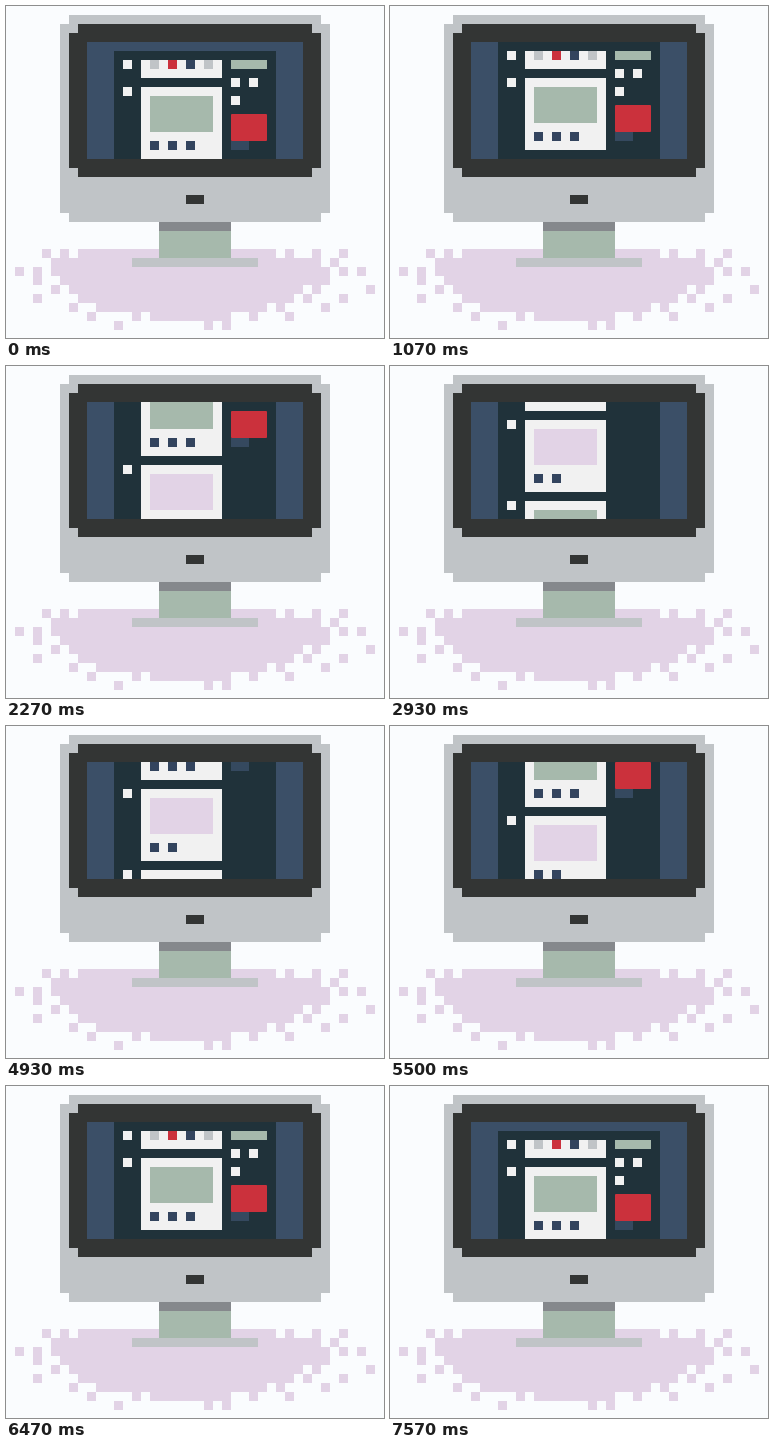
Animation, 378 px wide and 332 px high, one loop 8000 ms. Source, as an HTML page with a canvas:

```html
<!DOCTYPE html>
<html lang="en">
<head>
<meta charset="utf-8">
<title>Pixel monitor</title>
<style>
  html, body { margin: 0; width: 100%; height: 100%; overflow: hidden; background: #fafcfe; }
  canvas { display: block; width: 378px; height: 332px; }
</style>
</head>
<body>
<canvas id="stage" width="378" height="332"></canvas>
<script>
const CELL = 9;
const LOOP = 8000;
const ctx = document.getElementById('stage').getContext('2d');

const C = {
  bg: '#fafcfe', shell: '#c0c4c7', bezel: '#333534', desk: '#3b4f67',
  page: '#20323a', card: '#f1f1f1', green: '#a6b9ac', lilac: '#e2d3e6',
  red: '#cb313c', navy: '#33445e', note: '#35495f', shade: '#85888c'
};

// Times at which the page moves by one cell.
const DOWN = [1000, 1300, 1530, 1730, 1930, 2100, 2270, 2400, 2530, 2630, 2730, 2870];
const UP = [4930, 5130, 5370, 5500, 5670, 5830, 5970, 6130, 6230, 6330, 6430, 6530];

// Spill under the stand: filled columns per row, from row 27 down.
const SPILL = [
  '4 6 8-29 31 34 37',
  '5-6 7-34 36',
  '1 3 5-35 37 39',
  '3 6-35',
  '5 7-32 34 40',
  '3 8-31 33 37',
  '7 10-28 30 35',
  '9 14 16-24 27 31',
  '12 22 24'
];

// All measures are in cells.
function box(color, x, y, w = 1, h = 1) {
  ctx.fillStyle = color;
  ctx.fillRect(x * CELL, y * CELL, w * CELL, h * CELL);
}

function drawSpill() {
  SPILL.forEach((row, i) => row.split(' ').forEach(span => {
    const [a, b = a] = span.split('-').map(Number);
    box(C.lilac, a, 27 + i, b - a + 1);
  }));
}

function drawMonitor() {
  box(C.shell, 7, 1, 28, 23);
  box(C.shell, 6, 2, 30, 21);
  box(C.bezel, 8, 2, 26, 17);
  box(C.bezel, 7, 3, 28, 15);
  box(C.bezel, 20, 21, 2);
  box(C.shade, 17, 24, 8);
  box(C.green, 17, 25, 8, 3);
  box(C.shell, 14, 28, 14);
}

function drawCard(y, color, icons) {
  box(C.card, 15, y, 9, 8);
  box(color, 16, y + 1, 7, 4);
  for (let i = 0; i < icons; i++) box(C.navy, 16 + 2 * i, y + 6);
}

function drawPage() {
  box(C.page, 12, 5, 18, 36);
  box(C.card, 15, 6, 9, 2);
  [C.shell, C.red, C.navy, C.shell].forEach((c, i) => box(c, 16 + 2 * i, 6));
  [6, 9, 18, 27].forEach(y => box(C.card, 13, y));

  drawCard(9, C.green, 3);
  drawCard(18, C.lilac, 2);
  drawCard(27, C.green, 3);

  box(C.green, 25, 6, 4);
  [[25, 8], [27, 8], [25, 10]].forEach(([x, y]) => box(C.card, x, y));
  box(C.note, 25, 15, 2);
  ctx.fillStyle = C.red;
  ctx.beginPath();
  ctx.roundRect(25 * CELL, 12 * CELL, 4 * CELL, 3 * CELL, 1);
  ctx.fill();
}

function scrollAt(t) {
  const passed = times => times.filter(at => t >= at).length;
  return passed(DOWN) - passed(UP);
}

function draw(t) {
  box(C.bg, 0, 0, 42, 37);
  drawSpill();
  drawMonitor();
  ctx.save();
  ctx.beginPath();
  ctx.rect(9 * CELL, 4 * CELL, 24 * CELL, 13 * CELL);
  ctx.clip();
  box(C.desk, 9, 4, 24, 13);
  ctx.translate(0, -scrollAt(t) * CELL);
  drawPage();
  ctx.restore();
}

const start = performance.now();
function tick() {
  draw((performance.now() - start) % LOOP);
  requestAnimationFrame(tick);
}
tick();
</script>
</body>
</html>
```
